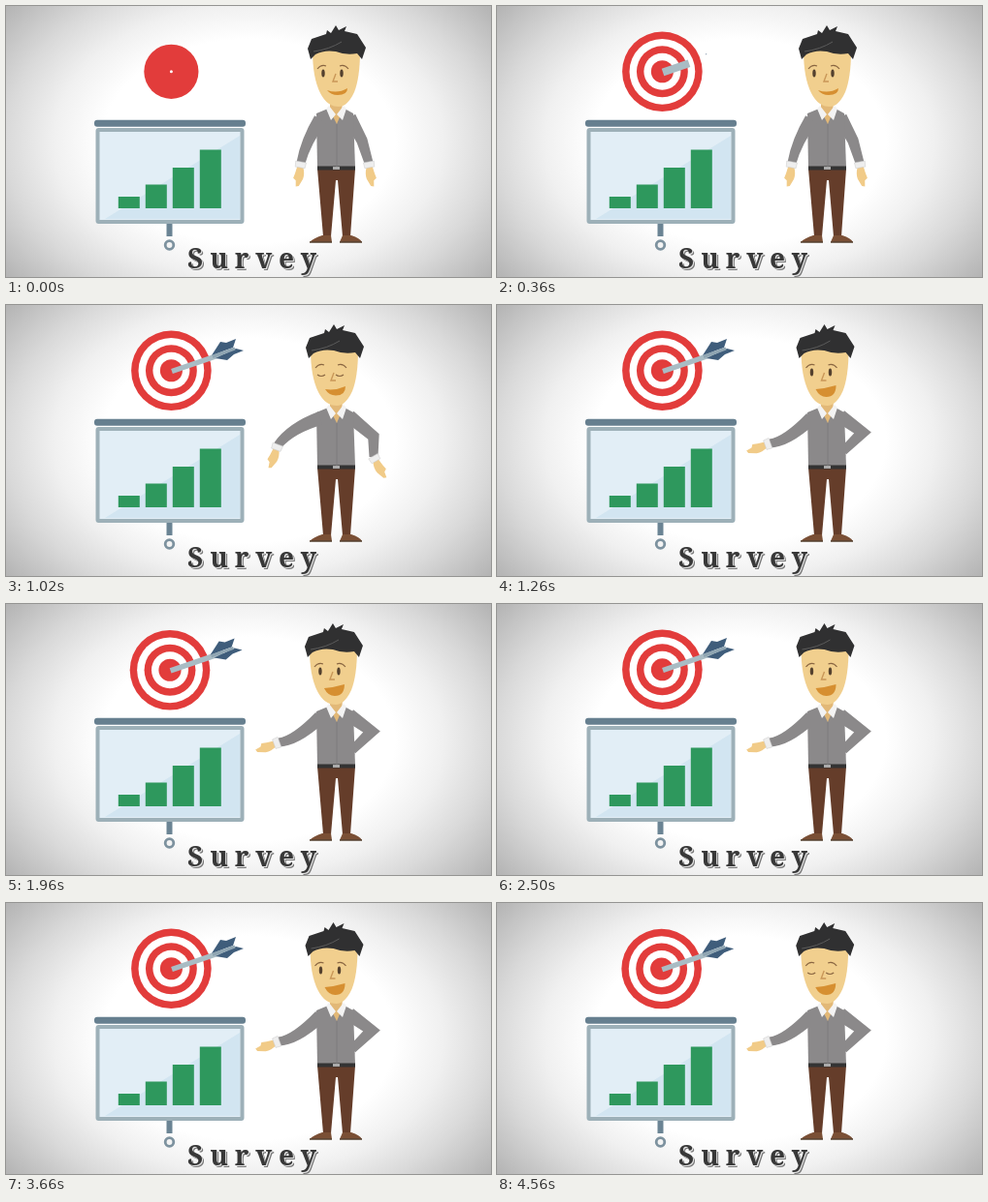
Write an HTML page that moves like this. It is 500 by 280 pixels and loops after 4.62 s.

```html
<!DOCTYPE html>
<html lang="en">
<head>
<meta charset="utf-8">
<title>Survey</title>
<style>
  html, body { margin: 0; width: 100%; height: 100%; overflow: hidden; }
  svg { display: block; width: 100vw; height: 100vh; }
  text { font: 900 28px "Noto Serif", serif; letter-spacing: 6.8px; }
</style>
</head>
<body>
<svg viewBox="0 0 500 280">
  <defs>
    <radialGradient id="room" gradientUnits="userSpaceOnUse" cx="0" cy="0" r="1"
                    gradientTransform="translate(250 140) scale(335 235)">
      <stop offset=".45" stop-color="#fff"/>
      <stop offset=".6" stop-color="#f0f0f0"/>
      <stop offset=".75" stop-color="#d9d9d9"/>
      <stop offset=".96" stop-color="#b2b2b2"/>
    </radialGradient>
  </defs>
  <rect width="500" height="280" fill="url(#room)"/>

  <g id="board">
    <path d="M168.5 224V238" stroke="#6b8494" stroke-width="6"/>
    <circle cx="168.5" cy="247" r="4.3" fill="#f3f3f3" stroke="#7d929f" stroke-width="2.8"/>
    <rect x="94.5" y="128" width="149" height="95" rx="1" fill="#e2eef6" stroke="#9db0b8" stroke-width="4"/>
    <path d="M102 220L241 134V220Z" fill="#d2e5f1"/>
    <rect x="91" y="117.7" width="156" height="7" rx="3" fill="#667f8f"/>
    <g id="bars" fill="#2e985d"></g>
  </g>

  <g id="target">
    <g id="rings"></g>
    <path id="shaft" fill="none" stroke="#a9bcc4"/>
    <g id="feather" fill="#3f5d7b">
      <path d="M212 52L221 38L227 39L237 35L234 44Z"/>
      <path d="M216 55L228 57L235 51L245 47L237 45Z"/>
      <path d="M213 53.5L236 45" stroke="#8fa5b2" stroke-width="3"/>
    </g>
  </g>

  <g id="man">
    <g id="rightArm"></g>
    <path d="M321 168H360L355 238H347L342 180H340L335 238H327Z" fill="#653d2a"/>
    <path d="M313 244Q317 240 326 237H335L336 244ZM367 244Q365 240 356 237H347L344 244Z" fill="#7a4f35"/>
    <path d="M313 244H336M344 244H367" stroke="#54402f" stroke-width="1.5"/>
    <path d="M332 106H349L358 111L360 167H321L320 111Z" fill="#8b898a"/>
    <path d="M321 167.5H360" stroke="#333" stroke-width="4"/>
    <path d="M337 167.5H344" stroke="#aaa" stroke-width="3"/>
    <path d="M334 99H347L346 110L341 122L334 108Z" fill="#e2b877"/>
    <path d="M333 103L340 112L335 118L330 106ZM348 103L341 112L347 118L351 106Z" fill="#f3f3f3"/>
    <path d="M341 122V166" stroke="#7d7b7c"/>
    <g id="leftArm"></g>
    <g id="head">
      <path d="M316 46H365Q365 74 359 89Q352 104 343 104Q331 104 324 90Q316 74 316 46Z" fill="#f1cf8e"/>
      <path d="M314 55L311 44L315 34L330 29L331 25L335 28L340 20L343 25L351 21L349 26L362 29L371 43L367 55L362 49Q350 51 340 47Q328 45 319 50Z" fill="#303031"/>
      <path d="M317 47Q333 45 346 37" fill="none" stroke="#5b5b5b"/>
      <path d="M321 65Q325 60 330 62M344 62Q349 60 353 65" fill="none" stroke="#8a6641" stroke-width="1.2"/>
      <path d="M340 70L337 78H342" fill="none" stroke="#c99758" stroke-width="1.4"/>
      <g id="openEyes" fill="#54412e">
        <ellipse cx="327" cy="69.5" rx="1.7" ry="4"/>
        <ellipse cx="346" cy="69.5" rx="1.7" ry="4"/>
      </g>
      <path id="closedEyes" d="M323 72Q327 75 331 72M342 72Q346 75 350 72" fill="none" stroke="#8a6641" stroke-width="1.2"/>
      <path id="mouth" fill="#d68f31"/>
    </g>
  </g>

  <g>
    <text x="189" y="272.5" fill="#777">Survey</text>
    <text x="188" y="271.5" fill="#e4e4e4">Survey</text>
    <text x="187" y="270.5" fill="#383838">Survey</text>
  </g>
</svg>
<script>
const LOOP = 4620, STEP = 60;
const MOVES = [[0, 1260], [1660, 2800], [3000, 3660], [4260, 4560]];
const $ = id => document.getElementById(id);
const set = (id, name, value) => $(id).setAttribute(name, value);
const ramp = (t, start, length) => Math.max(0, Math.min(1, (t - start) / length));
const ease = x => x * x * (3 - 2 * x);
const mix = (a, b, k) => a.map((v, i) => v + (b[i] - v) * k);

// Elbow, wrist, hand direction
const LEFT = {
  shoulder: [324, 117], bend: 'Q',
  rest: [309, 140, 304, 162, 100], raised: [294, 127, 280, 145, 110], point: [298, 142, 281, 143, 160]
};
const RIGHT = {
  shoulder: [354, 115], bend: 'L',
  rest: [367, 139, 374, 162, 80], raised: [379, 136, 379, 157, 60], point: [377, 132, 357, 151, 165]
};

function normal([ax, ay], [bx, by]) {
  const length = Math.hypot(bx - ax, by - ay);
  return [(ay - by) / length, (bx - ax) / length];
}

// A sleeve that narrows from shoulder to wrist
function sleeve(shoulder, elbow, wrist, bend) {
  const n1 = normal(shoulder, elbow), n2 = normal(elbow, wrist);
  const miter = 1 + n1[0] * n2[0] + n1[1] * n2[1];
  const middle = n1.map((v, i) => (v + n2[i]) / miter);
  const edge = (p, n, half) => p.map((v, i) => v + n[i] * half).join(' ');
  const curve = side => [edge(shoulder, n1, 7 * side), edge(elbow, middle, 5.7 * side), edge(wrist, n2, 4.5 * side)];
  const join = bend === 'Q' ? ' ' : 'L';
  const [a, b, c] = curve(1), [d, e, f] = curve(-1);
  return `M${a}${bend}${b}${join}${c}L${f}${bend}${e}${join}${d}Z`;
}

function drawArm(id, arm, raise, point, swing) {
  const [ex, ey, wx, wy, angle] = mix(mix(arm.rest, arm.raised, raise), arm.point, point);
  const wrist = [wx + swing, wy - swing / 2];
  $(id).innerHTML = `
    <path d="${sleeve(arm.shoulder, [ex, ey], wrist, arm.bend)}" fill="#8b898a"/>
    <g transform="translate(${wrist}) rotate(${angle}) scale(1 ${arm === LEFT ? 1 : -1})">
      <path d="M4 -3Q10 -6 16 -5L24 -2L25 1L19 2L17 5L12 4L4 3Z" fill="#f1cb88"/>
      <path d="M-1 -5.5L5 -5V5L-1 5.5Z" fill="#eee" stroke="#ccc" stroke-width=".5"/>
    </g>`;
}

function drawTarget(t) {
  $('rings').innerHTML = [0, 1, 2, 3, 4].map(i => {
    const grow = i ? ramp(t, 60 * i - 68, 180) : .68 + .32 * ramp(t, 0, 180);
    const radius = 41.3 * (1 - .18 * i) * grow;
    return `<circle cx="170.4" cy="67.8" r="${radius}" fill="${i % 2 ? '#fff' : '#e23c3b'}"/>`;
  }).join('');
  const length = ramp(t, 240, 240), fletch = ramp(t, 350, 190);
  set('shaft', 'd', `M171 68.5l${54 * length} ${-18.5 * length}`);
  set('shaft', 'stroke-width', length ? 8 - 2.5 * fletch : 0);
  set('feather', 'transform', `translate(215 50) scale(${fletch}) translate(-215 -50)`);
}

function draw(t) {
  const drift = t < 1260 ? 0 : .75 * (Math.cos((t - 1260) / 1200 * 2 * Math.PI) - 1);
  const raise = ease(ramp(t, 600, 420)), point = ease(ramp(t, 1020, 240));
  const smile = (raise + point) / 2;
  drawTarget(t);
  set('target', 'transform', `translate(${drift} ${-drift / 3})`);
  drawArm('leftArm', LEFT, raise, point, 0);
  drawArm('rightArm', RIGHT, raise, point, 10 * Math.sin(Math.PI * raise));
  set('head', 'transform', `translate(${-2 * raise - .5 * point + drift * .4} 0)`);

  const blink = (t + 220) % 1180 < 120;
  set('openEyes', 'visibility', blink ? 'hidden' : 'visible');
  set('closedEyes', 'visibility', blink ? 'visible' : 'hidden');
  const low = 92 + 3 * smile;
  set('mouth', 'd', `M331 87Q342 ${91 - 5 * smile} 352 ${85 - 2 * smile}Q352 ${low} 342 ${low}Q335 ${low} 331 87Z`);
}

function frame(now) {
  const t = now % LOOP;
  const [start, end] = MOVES.findLast(move => move[0] <= t);
  draw(Math.min(end, start + Math.floor((t - start) / STEP) * STEP));
  requestAnimationFrame(frame);
}

$('bars').innerHTML = [12, 24.5, 42, 60.5].map((height, i) =>
  `<rect x="${115.8 + 28 * i}" y="${209 - height}" width="22" height="${height}"/>`).join('');
draw(0);
requestAnimationFrame(frame);
</script>
</body>
</html>
```
